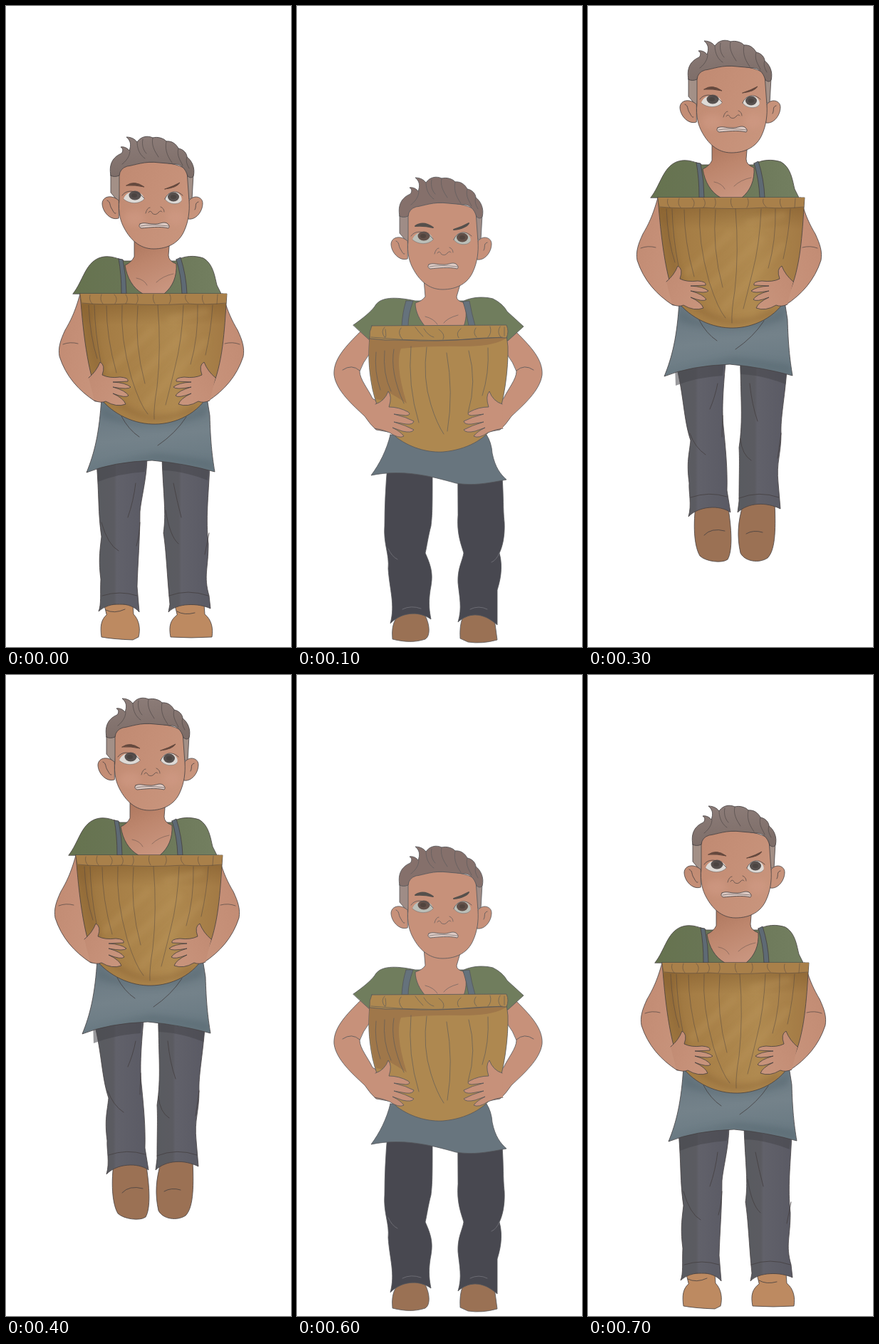
An HTML page for the animation above (0.8 s loop, 400 by 900 pixels).

```html
<!DOCTYPE html>
<html lang="en">
<head>
<meta charset="utf-8">
<title>Man jumping with a basket</title>
<style>
html, body { margin: 0; height: 100%; overflow: hidden; background: #fff }
svg { display: block; width: 100vw; height: 100vh }
path, ellipse { stroke: var(--ink); stroke-width: .8; stroke-linejoin: round; stroke-linecap: round }
.pose { display: none }
.line { fill: none }
.soft { stroke: none }
.shaded { --ink: #453f40; --skin: url(#skin); --hair: url(#hair); --side: #a39087; --eye: #dedad6; --iris: #57504e; --brow: #64483d; --thick: 1;
  --shirt: url(#shirt); --pants: url(#pants); --shoe: #9b7154; --blush: .6 }
.flat { --ink: #55565a; --skin: #c7917a; --hair: #85706b; --side: #9f8c86; --eye: #bcbfb8; --iris: #625049; --brow: #55504c; --thick: 2;
  --shirt: #707d5d; --pants: #484850; --shoe: #9a7154; --blush: 0 }
.skin { fill: var(--skin) }
.hair { fill: var(--hair) }
.side { fill: var(--side) }
.shirt { fill: var(--shirt) }
.pants { fill: var(--pants) }
.shoe { fill: var(--shoe) }
.brow { fill: var(--brow); stroke: var(--brow); stroke-width: var(--thick) }
.blush { opacity: var(--blush); stroke: none }
</style>
</head>
<body>
<svg viewBox="0 0 400 900">
<defs>
  <linearGradient id="skin" x1="0" y1="0" x2="1" y2=".6">
    <stop stop-color="#c08a72"/><stop offset=".5" stop-color="#c58f77"/><stop offset="1" stop-color="#c8947c"/>
  </linearGradient>
  <linearGradient id="neck" x1=".2" y1="0" x2=".6" y2="1">
    <stop stop-color="#ad765d"/><stop offset=".45" stop-color="#bd866d"/><stop offset="1" stop-color="#c9957f"/>
  </linearGradient>
  <linearGradient id="hair" x1="0" y1="0" x2=".2" y2="1">
    <stop stop-color="#8d7d79"/><stop offset="1" stop-color="#7d6d68"/>
  </linearGradient>
  <linearGradient id="shirt">
    <stop stop-color="#66734f"/><stop offset=".5" stop-color="#6a7657"/><stop offset="1" stop-color="#737f60"/>
  </linearGradient>
  <linearGradient id="pants">
    <stop stop-color="#595b60"/><stop offset=".35" stop-color="#5b5b61"/><stop offset=".4" stop-color="#61616a"/><stop offset="1" stop-color="#5a5a64"/>
  </linearGradient>
  <linearGradient id="pot">
    <stop stop-color="#97703b"/><stop offset=".2" stop-color="#a57d45"/><stop offset=".65" stop-color="#b08a50"/><stop offset="1" stop-color="#a27944"/>
  </linearGradient>
  <linearGradient id="potShade" x1="0" y1="0" x2="0" y2="1">
    <stop stop-color="#7d5729" stop-opacity=".45"/><stop offset="1" stop-color="#7d5729" stop-opacity="0"/>
  </linearGradient>
  <linearGradient id="apron" x1="0" y1="0" x2=".2" y2="1">
    <stop stop-color="#66757f"/><stop offset=".6" stop-color="#74828a"/><stop offset="1" stop-color="#6a7a83"/>
  </linearGradient>
  <filter id="blur" x="-50%" y="-50%" width="200%" height="200%"><feGaussianBlur stdDeviation="4"/></filter>
  <path id="apronA" d="M134 550L282 550L286 575C287 610 289 630 293 654Q250 642 205 638Q150 640 113 655C124 628 131 600 134 550Z"/>
  <clipPath id="apronClip"><use href="#apronA"/></clipPath>
  <path id="potA" d="M104 404L310 404L309 419C306 465 303 510 285 545C265 578 230 588 205 587C175 586 145 570 128 545C112 505 107 440 104 404Z"/>
  <clipPath id="potClip"><use href="#potA"/></clipPath>

  <g id="head">
    <path class="side" d="M147 235L147 262L159 276L161 232ZM253 232L254 270L261 272L263 236Z"/>
    <path class="skin" d="M158 273C150 265 136 266 135 277C135 289 147 302 158 298ZM257 273C264 264 276 268 276 277C276 289 266 301 256 299Z"/>
    <path class="line" d="M142 273C147 275 145 279 148 284S152 292 154 291M270 275C264 277 268 281 265 286"/>
    <path class="skin" d="M159 230L159 272C157 290 161 303 166 312C174 327 187 341 207 341C228 341 243 332 250 316C256 303 258 288 257 274L254 232C246 216 172 214 159 230Z"/>
    <g class="blush" filter="url(#blur)" fill="#d09a84">
      <ellipse class="soft" cx="180" cy="298" rx="15" ry="11"/><ellipse class="soft" cx="238" cy="297" rx="13" ry="11"/>
    </g>
    <path class="hair" d="M147 238C144 222 150 212 162 207C165 203 164 200 161 198C166 197 171 200 173 203C176 195 175 189 169 184C176 184 181 187 184 191C190 182 200 182 206 185C213 183 222 186 225 190C233 189 239 194 242 200C249 201 254 207 254 212C261 217 266 228 263 239Q260 243 255 239C252 228 245 222 238 222L215 220C195 217 180 224 170 225Q160 228 159 238Q152 241 147 238Z"/>
    <path class="line" opacity=".7" d="M184 191C184 203 190 211 195 214M174 203C174 212 167 219 163 222M206 185C203 198 212 208 214 212M225 190C222 204 229 214 233 220M242 200C239 210 245 217 248 224M192 187C190 197 194 204 197 207M254 212Q251 218 257 228"/>
    <path class="soft" fill="var(--eye)" d="M165 271C167 264 174 260 182 261C190 262 193 266 194 271C188 278 174 279 165 271ZM223 271C226 263 232 260 239 261C246 264 248 271 246 274C242 280 228 279 223 271Z"/>
    <path class="line" opacity=".5" d="M165 271C174 279 188 278 194 271M223 271C228 279 242 280 246 274"/>
    <ellipse class="soft" fill="var(--iris)" cx="181" cy="266" rx="8.5" ry="6.5"/>
    <ellipse class="soft" fill="var(--iris)" cx="235" cy="268" rx="8" ry="6.5"/>
    <ellipse class="soft" fill="#39312f" opacity=".4" cx="180" cy="266" rx="4" ry="3"/>
    <ellipse class="soft" fill="#39312f" opacity=".4" cx="235" cy="268" rx="4" ry="3"/>
    <path class="line" d="M163 266C169 257 184 258 194 270M223 271C228 259 240 258 248 266"/>
    <path class="brow" d="M169 252Q180 244 194 254Q181 251 169 252ZM223 257Q235 253 244 248Q240 255 223 257Z"/>
    <path class="line" opacity=".8" d="M196 291Q198 283 202 283M217 282Q222 284 222 289M200 290Q202 286 205 290M214 290Q217 286 219 289M205 291Q210 295 214 290"/>
    <path fill="#dfcbc4" d="M188 306C194 303 198 306 207 306C216 307 220 302 226 305Q231 309 228 312C215 309 202 311 190 312Q185 310 188 306Z"/>
    <path class="line" opacity=".7" d="M189 309Q203 306 228 309"/>
  </g>

  <g id="armA">
    <path class="skin" d="M104 404C97 430 90 443 83 455C76 470 73 480 75 492C84 520 102 540 125 555L140 555L135 510L112 420Z"/>
    <path class="line" opacity=".8" d="M80 475Q90 471 101 474"/>
  </g>
  <path id="handA" class="skin" d="M116 522Q127 513 132 500Q140 504 135 518Q145 523 160 521Q173 522 171 527L150 528Q168 529 175 535Q172 539 150 535Q168 540 172 547Q168 551 150 544Q165 551 168 559Q155 564 140 555Q133 558 124 554"/>
  <g id="upperA">
    <path class="soft" fill="#45454c" opacity=".55" d="M128 640L197 636L195 654Q160 656 129 668ZM219 636L285 645L283 666Q250 653 220 652Z"/>
    <use href="#apronA" fill="url(#apron)"/>
    <g clip-path="url(#apronClip)">
      <path class="soft" fill="#566770" opacity=".5" filter="url(#blur)" d="M134 560Q200 610 283 558L280 575Q210 602 134 578ZM113 655Q125 645 210 628Q270 634 291 640L293 654Q250 642 205 638Q150 640 113 655Z"/>
    </g>
    <path class="line" d="M162 576Q172 595 187 605M253 577Q238 600 213 617"/>
    <use href="#armA"/><use href="#armA" transform="matrix(-1 0 0 1 408 0)"/>
    <path class="shirt" d="M94 404C108 386 111 362 130 354C142 349 154 353 166 358L238 358C250 350 265 350 277 354C291 362 293 380 296 392L302 404Z"/>
    <path fill="url(#neck)" d="M180 328L180 352Q176 360 167 364C170 382 178 396 192 404L222 404C234 394 240 380 239 362Q228 358 228 350L230 326Z"/>
    <path class="line" opacity=".5" d="M183 382Q194 384 198 392M235 376Q220 379 211 388"/>
    <path fill="#5e6a74" d="M158 355L164 356Q169 380 169 404L162 404Q162 376 158 355ZM239 356L245 353Q253 378 254 404L247 404Q246 378 239 356Z"/>
    <use href="#potA" fill="url(#pot)"/>
    <g clip-path="url(#potClip)">
      <path class="soft" fill="url(#potShade)" d="M104 418L310 418L305 448L109 448Z"/>
      <path class="line" style="stroke:#bc965b;stroke-width:7" opacity=".5" filter="url(#blur)" d="M145 510L205 455M170 535L250 462M195 560L280 470M230 440L282 428"/>
      <path class="line" style="stroke:#78522a;stroke-width:6" opacity=".4" filter="url(#blur)" d="M115 430Q124 515 150 550Q200 598 265 565"/>
      <path class="soft" fill="#a9804a" d="M104 404L310 404L309 417Q280 420 255 418Q205 421 170 418Q135 420 107 417Z"/>
    </g>
    <path class="line" opacity=".55" d="M107 417Q135 420 170 418Q205 421 255 418Q280 420 309 417M118 406Q116 413 121 418M134 405Q131 413 136 418M152 405Q158 411 153 418M168 405Q173 412 168 418M184 405Q187 413 183 418M207 405Q205 412 209 418M230 405Q233 412 229 418M252 406Q250 412 256 417M276 406Q274 412 278 418M297 405L296 418
      M116 420Q118 465 128 495M124 420Q125 460 133 500M141 421Q141 465 155 515M163 420Q160 465 176 522Q188 560 199 573M185 421Q180 475 195 530M213 420Q218 480 212 535Q207 565 208 580M249 420Q247 470 237 508Q228 545 224 560M269 420Q270 465 259 503M290 420Q288 455 280 490"/>
    <use href="#handA"/><use href="#handA" transform="matrix(-1 0 0 1 410 0)"/>
    <use href="#head"/>
  </g>

  <g id="armB">
    <path class="skin" d="M92 488C78 503 52 525 54 550C57 572 80 592 97 608Q105 620 113 627L130 630L120 590L108 583C102 570 90 556 90 545Q94 533 104 520L112 495Z"/>
    <path class="line" d="M66 543Q79 534 90 544"/>
  </g>
  <path id="handB" class="skin" d="M112 591Q125 587 130 573Q136 580 131 595Q145 595 158 602Q163 606 155 607L138 605Q155 609 166 615Q165 620 155 619L138 616Q155 621 166 627Q163 632 150 629L136 624Q148 630 152 636Q145 640 132 631Q120 626 111 625"/>
  <g id="upperB">
    <path fill="#68757e" d="M133 634L268 634Q275 645 276 660C280 680 288 690 296 697C270 702 250 706 225 702C190 692 150 682 106 691C118 675 128 655 133 634Z"/>
    <use href="#armB"/><use href="#armB" transform="matrix(-1 0 0 1 400 0)"/>
    <path class="shirt" d="M81 480C95 470 105 462 111 454C118 440 140 440 168 446L236 446C250 440 265 440 277 443Q291 450 297 461L320 482L298 502L104 501Z"/>
    <path class="skin" d="M180 416L182 440Q178 446 168 449C168 462 175 474 182 482L236 482C241 468 240 456 235 448Q226 446 226 440L233 416Z"/>
    <path class="line" opacity=".7" d="M182 468Q194 471 199 479M228 466Q213 470 208 477"/>
    <path fill="#65727c" d="M155 446L165 446Q158 465 158 481L149 481Q150 462 155 446ZM235 447L244 446Q247 463 252 481L243 481Q240 462 235 447Z"/>
    <path fill="#ae8850" d="M104 496C102 520 102 540 108 570C115 600 125 622 142 638C165 655 190 659 207 658C240 655 265 641 280 620C293 590 299 540 298 510L296 494Z"/>
    <path class="soft" fill="#9f774a" d="M104 498L296 498Q280 510 235 510Q190 509 148 513Q139 535 156 590Q144 582 130 574L126 586L113 584C106 560 102 530 104 498Z"/>
    <path fill="#ae8850" d="M107 481L296 480Q300 489 296 498Q280 497 250 499Q200 504 150 501Q125 502 104 499Q103 489 107 481Z"/>
    <path class="line" opacity=".75" d="M125 483Q119 489 125 497Q128 499 126 486M148 484Q142 491 150 500M168 483Q173 490 179 496M180 485Q186 495 194 497M201 486Q211 493 207 500M232 485Q224 491 229 498M253 484Q248 491 254 497M273 482Q276 491 270 497M287 482Q282 490 288 497M293 483L293 495M106 497Q190 506 290 497
      M113 518Q110 545 119 571M125 516Q122 548 134 573M138 514Q132 546 152 590M162 510Q157 565 173 617M184 511Q178 555 190 592Q198 618 208 633M212 519Q222 575 213 629M243 516Q255 560 242 603M270 512Q272 548 262 579"/>
    <use href="#handB"/><use href="#handB" transform="matrix(-1 0 0 1 402 0)"/>
    <use href="#head" x="-1" y="89"/>
  </g>
</defs>

<g class="pose shaded" id="stand" style="--shoe:#bd8a61">
  <path class="shoe" d="M138 840L178 840L179 854C187 862 189 875 186 886L178 890Q150 889 134 886C132 872 133 862 141 855ZM237 840L278 840L279 854C289 862 291 875 289 886Q260 888 231 886C228 870 231 862 240 855Z"/>
  <path class="line" d="M140 848Q152 854 167 847M240 850Q250 856 265 852"/>
  <path class="pants" d="M127 640L198 636C197 665 190 690 188 710C188 750 185 780 184 815L187 851C175 836 145 836 130 850C134 840 132 825 133 805C130 780 131 770 134 745C129 710 131 690 127 640Z"/>
  <path class="pants" d="M219 636L286 645C284 690 280 720 284 755C284 790 277 800 285 828L287 846C270 838 240 838 228 851L230 840C226 800 225 765 221 740C225 710 221 690 219 636Z"/>
  <path class="line" d="M134 725Q143 757 158 765M188 725Q187 745 183 758M182 670Q179 695 171 718M135 828Q160 820 184 828M235 670Q240 695 246 718M224 708Q230 745 242 755M229 828Q255 818 284 828M285 740L279 770"/>
  <use href="#upperA"/>
</g>

<g class="pose shaded" id="rise">
  <path class="shoe" d="M151 702L196 700C202 735 203 765 196 777C188 783 165 780 157 772C150 760 147 735 151 702ZM218 698L262 698C264 740 262 765 252 775C240 783 220 780 214 768C209 745 210 725 218 698Z"/>
  <path class="line" d="M163 743Q173 732 192 737M222 741Q232 735 245 739"/>
  <path class="pants" d="M124 505L193 501C189 545 188 570 190 590C193 620 196 650 195 680L200 711C185 700 155 702 141 717C146 700 141 682 142 670C138 640 142 630 144 610C134 580 135 550 124 505Z"/>
  <path class="pants" d="M214 501L279 512C276 550 270 580 271 600C271 630 264 640 267 670L270 706C250 696 225 697 210 711L212 695C212 660 213 640 212 620C218 580 214 550 214 501Z"/>
  <path class="line" d="M143 600Q150 620 165 630M189 575L188 605M182 530Q178 550 171 566M144 690Q170 681 195 689M227 530Q230 560 238 583M214 608Q216 630 229 638M212 691Q240 680 268 690M271 600L266 635"/>
  <use href="#upperA" x="-6" y="-135"/>
</g>

<g class="pose shaded" id="fall">
  <path class="shoe" d="M137 755L182 755C186 790 184 810 176 822C165 832 140 830 133 812C129 795 131 775 137 755ZM231 755L273 755C280 785 281 805 274 822C262 832 240 830 231 810C226 795 227 778 231 755Z"/>
  <path class="line" d="M147 791Q160 787 172 791M236 793Q248 787 262 791"/>
  <path class="pants" d="M127 580L196 578C188 610 183 640 182 655L184 668C186 700 183 740 186 757L187 765C170 752 150 750 130 769C134 755 128 745 132 730C124 700 124 680 124 655Q129 630 127 580Z"/>
  <path class="pants" d="M219 578L277 585C276 620 279 640 281 655C283 690 277 700 274 720L277 764C260 752 240 752 219 768C224 740 220 710 228 668L222 655C226 630 219 610 219 578Z"/>
  <path class="line" d="M124 652L131 657M183 610Q180 630 173 648M180 650L171 666M133 746Q160 733 186 744M232 605Q236 635 244 656M222 650L229 667M222 745Q250 734 276 745"/>
  <use href="#upperA" x="-4" y="-52"/>
</g>

<g class="pose flat" id="crouch">
  <path class="shoe" d="M131 830L178 830C180 850 181 870 180 880C165 889 150 888 122 880C118 865 123 856 133 850ZM231 832L281 830C283 855 282 870 278 884Q250 886 231 875C227 860 230 850 231 832Z"/>
  <path class="pants" d="M131 680L196 698C190 715 180 735 170 750C172 765 180 765 180 778C178 800 180 815 187 833Q155 828 124 836C128 815 128 800 125 780C118 765 114 745 120 725C122 710 128 700 131 680Z"/>
  <path class="pants" d="M228 698L286 700L285 765C286 790 278 800 280 820L284 832C265 832 240 835 227 840C224 825 228 800 228 780C220 765 221 750 224 740C228 725 227 710 228 698Z"/>
  <path class="line" style="stroke:#74747b" d="M171 768Q166 785 145 804M170 785L160 803M227 752Q236 774 250 783L263 781M284 772Q283 788 273 795M236 822Q250 815 266 820"/>
  <path class="line" d="M244 852Q251 849 259 852"/>
  <use href="#upperB"/>
</g>

<g class="pose flat" id="land">
  <path class="shoe" d="M139 860Q160 846 180 856C187 870 187 885 180 889C165 894 150 893 134 889Q132 870 139 860ZM232 860Q250 848 277 860L281 890Q260 896 240 893L229 888Q228 870 232 860Z"/>
  <path class="pants" d="M127 645L190 660C190 700 190 715 188 730C184 745 182 760 180 768C190 790 191 800 187 820C184 840 186 850 188 861C170 848 145 852 131 867C138 840 130 820 128 790C130 770 121 755 123 730Q123 690 127 645Z"/>
  <path class="pants" d="M226 660L288 662C290 690 289 705 291 725C292 745 288 760 284 768C290 790 284 810 281 820L281 869C260 850 240 852 226 865C232 845 228 830 226 810C225 790 232 780 234 768C230 755 224 740 226 715Z"/>
  <path class="line" style="stroke:#74747b" d="M128 762Q133 773 141 777M284 768Q280 778 273 781M148 847Q160 841 174 846M243 847Q255 841 267 847"/>
  <use href="#upperB" x="-2" y="-32"/>
</g>
</svg>
<script>
const poses = ['stand', 'land', 'crouch', 'rise', 'rise', 'fall', 'land', 'stand'];
const groups = document.querySelectorAll('.pose');
const rise = document.getElementById('rise');
const start = performance.now();

function draw(now) {
  const step = Math.floor(Math.max(0, now - start) / 100) % poses.length;
  for (const g of groups) g.style.display = g.id === poses[step] ? 'inline' : 'none';
  // the top of the jump hangs a little higher
  rise.setAttribute('transform', `translate(0 ${step === 4 ? -16 : 0})`);
  requestAnimationFrame(draw);
}
draw(start);
</script>
</body>
</html>
```
